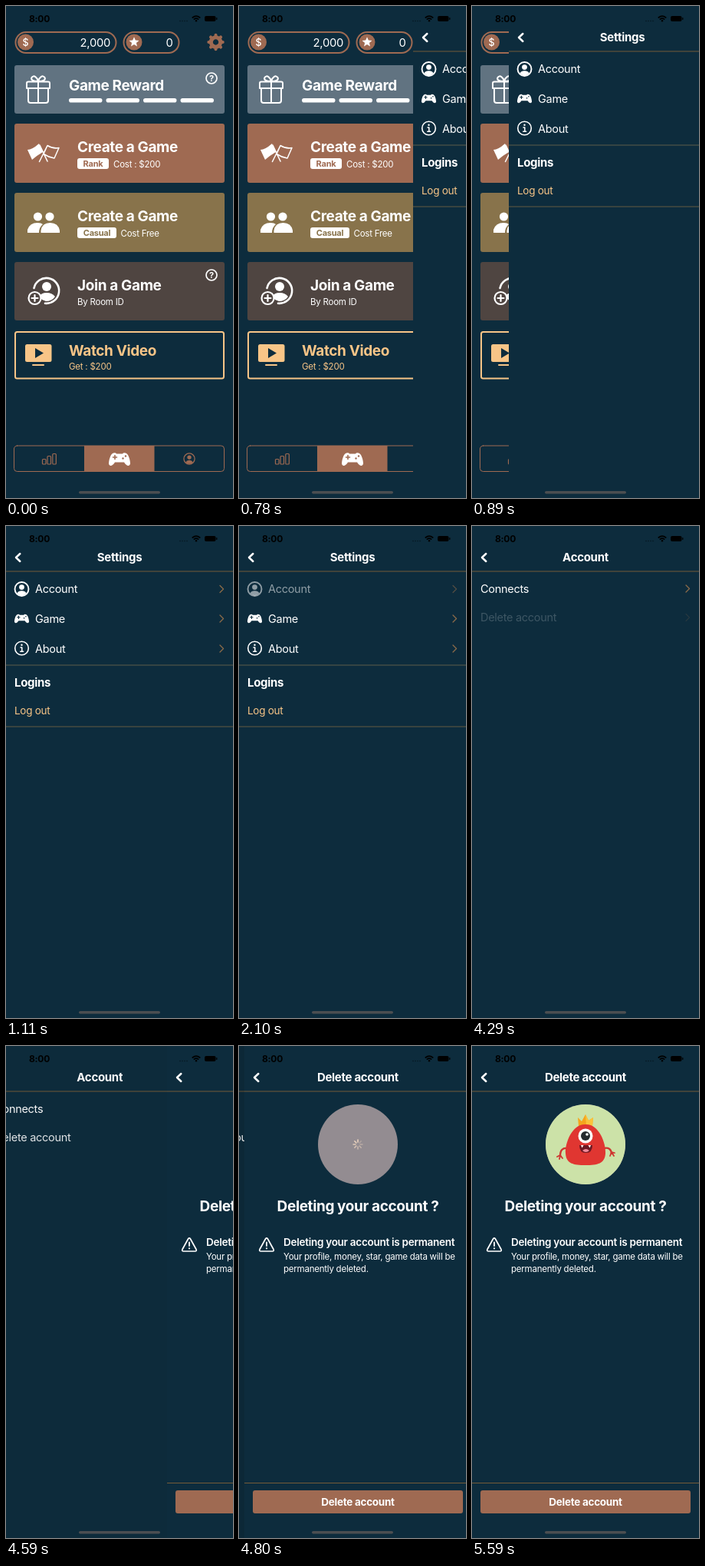
An HTML page with a canvas for the animation above (7990 ms loop, 296 by 640 pixels).

```html
<!DOCTYPE html>
<html lang="en">
<head>
<meta charset="utf-8">
<title>Game settings flow</title>
<style>
  html, body { margin: 0; width: 100%; height: 100%; overflow: hidden; background: #0d2c3d; }
  canvas { display: block; width: 296px; height: 640px; }
</style>
</head>
<body>
<canvas id="stage"></canvas>
<script>
const W = 296, H = 640, LOOP = 7990;
const BG = '#0d2c3d', WHITE = '#fff', COPPER = '#9f6a52', PEACH = '#f8c587', LINE = '#745b38', CHEVRON = '#8b6b49';
// The screen refreshes only at these moments.
const TICKS = [0, 500, 670, 780, 890, 1000, 1110, 1970, 2100, 2210, 2320, 2430, 2540,
  4290, 4480, 4590, 4690, 4800, 4910, 5040, 5160, 5270, 5370, 5480, 5590];

const canvas = document.getElementById('stage');
const ctx = canvas.getContext('2d');
const dpr = window.devicePixelRatio || 1;
canvas.width = W * dpr;
canvas.height = H * dpr;

// ---- drawing helpers ----
function fill(path, color) {
  ctx.fillStyle = color;
  ctx.fill(new Path2D(path), 'evenodd');
}
function stroke(path, color = WHITE, width = 2) {
  ctx.strokeStyle = color;
  ctx.lineWidth = width;
  ctx.lineCap = ctx.lineJoin = 'round';
  ctx.stroke(new Path2D(path));
}
function box(x, y, w, h, r, color, lineWidth) {
  ctx.beginPath();
  ctx.roundRect(x, y, w, h, r);
  ctx.fillStyle = ctx.strokeStyle = color;
  ctx.lineWidth = lineWidth;
  lineWidth ? ctx.stroke() : ctx.fill();
}
const dot = (x, y, r, color, lineWidth) => box(x - r, y - r, 2 * r, 2 * r, r, color, lineWidth);

function text(str, x, y, size, weight = 400, color = WHITE, align = 'left') {
  ctx.font = `${weight} ${size}px Inter, sans-serif`;
  ctx.letterSpacing = `${-0.02 * size}px`;
  ctx.textAlign = align;
  ctx.textBaseline = 'alphabetic';
  ctx.fillStyle = color;
  ctx.fillText(str, x, y + size * 0.364);
}
function group(x, y, scale, alpha, draw) {
  ctx.save();
  ctx.translate(x, y);
  ctx.scale(scale, scale);
  ctx.globalAlpha *= alpha;
  draw();
  ctx.restore();
}

// ---- icons ----
function gamepad(x, y, scale, holes) {
  group(x, y, scale, 1, () => {
    fill('M-8 -8Q-5 -9 -4 -7H4Q5 -9 8 -8C12 -7 14 2 14 6C13 10 9 9 6 4H-6C-9 9 -13 10 -14 6C-14 2 -12 -7 -8 -8Z', WHITE);
    stroke('M-8.5 -2.5H-3.5M-6 -5V0', holes, 1.6);
    dot(4.5, -1, 1.2, holes);
    dot(8, -4, 1.2, holes);
  });
}
function person(x, y, r, color, width) {
  group(x, y, r / 9, 1, () => {
    dot(0, 0, 8.5, color, width);
    dot(0, -2.3, 3.2, color);
    fill('M-5.8 5.3Q-4 2.2 0 2.2T5.8 5.3Q3 8 0 8T-5.8 5.3Z', color);
  });
}
function gear(x, y, alpha) {
  group(x, y, 1, alpha, () => {
    let teeth = '';
    for (let i = 0; i < 8; i++) {
      const a = i * Math.PI / 4;
      teeth += `M${6 * Math.cos(a)} ${6 * Math.sin(a)}L${9.2 * Math.cos(a)} ${9.2 * Math.sin(a)}`;
    }
    stroke(teeth, COPPER, 4);
    dot(0, 0, 6.2, COPPER, 5);
  });
}
function help(x, y) {
  dot(x, y, 7, WHITE, 1.7);
  text('?', x, y, 11, 700, WHITE, 'center');
}
function star(x, y, r) {
  let path = '';
  for (let i = 0; i < 10; i++) {
    const a = i * Math.PI / 5 - Math.PI / 2, d = i % 2 ? r * 0.45 : r;
    path += `${i ? 'L' : 'M'}${x + d * Math.cos(a)} ${y + d * Math.sin(a)}`;
  }
  fill(path + 'Z', WHITE);
}
function spinner(x, y, t) {
  const head = Math.floor(t / 125) % 8;
  for (let i = 0; i < 8; i++) {
    const a = i * Math.PI / 4, c = Math.cos(a), s = Math.sin(a);
    group(x, y, 1, 1 - ((head - i + 8) % 8) * 0.1, () =>
      stroke(`M${3 * c} ${3 * s}L${6 * c} ${6 * s}`, '#f3d9c2', 1.5));
  }
}
function monster() {
  dot(148, 128, 52, '#cce2a8');
  stroke('M124 133Q115 132 115 143M172 133Q181 131 182 140', '#cf3530', 2.4);
  stroke('M115 142L111 144M115 142L114 147M115 142L118 146M182 138L186 139M182 138L185 143M182 138L180 143', '#cf3530', 1.8);
  fill('M139 104L138 93L143 98L148 89L152 97L158 93L157 104Z', '#f5a51d');
  fill('M148 89L152 97L158 93L157 104H149Z', '#fbc33a');
  fill('M148 102C165 101 175 126 174 140C173 153 164 155 148 155S123 153 122 140C121 126 131 101 148 102Z', '#e03631');
  dot(148, 117, 9.5, WHITE);
  dot(148, 117, 6, '#25292d');
  dot(150, 115, 1.8, WHITE);
  fill('M140 129H157Q157 139 148.5 139T140 129Z', '#6b1822');
  fill('M142 129L143.5 132.5L145.5 129ZM151.5 129L153.5 132.5L155 129Z', WHITE);
  fill('M144 136Q148.5 132 153 136Q148.5 140 144 136Z', '#f08a9b');
}

// ---- shared layout ----
function statusBar() {
  text('8:00', 30, 16.5, 12, 700, '#000');
  for (let i = 0; i < 4; i++) dot(227 + i * 3, 19.5, 0.7, '#04131c');
  stroke('M243.3 15Q248 11.2 252.7 15M245.4 17.2Q248 15 250.6 17.2', '#000', 1.7);
  dot(248, 19.2, 1.2, '#000');
  box(259, 13, 14.5, 7, 2, '#000');
  box(274.2, 15, 1.2, 3, 0.6, '#000');
  box(95, 631, 106, 3.6, 1.8, '#4b4e51');
}
function rule(y, color = LINE) {
  box(0, y - 0.5, W, 1, 0, color);
}
function header(title) {
  box(0, 0, W, H, 0, BG);
  stroke('M18.3 36L13 41L18.3 46', WHITE, 2.5);
  text(title, 148, 41, 15, 700, WHITE, 'center');
  rule(59);
}
function row(label, x, y, alpha = 1) {
  group(0, 0, 1, alpha, () => {
    text(label, x, y, 14.5);
    stroke(`M279 ${y - 4.5}L283.5 ${y}L279 ${y + 4.5}`, CHEVRON, 1.3);
  });
}
function badge(label, y, width, color) {
  box(93, y - 7, width, 14, 3, WHITE);
  text(label, 93 + width / 2, y, 11, 700, color, 'center');
}

// ---- screens ----
function home(gearAlpha) {
  box(0, 0, W, H, 0, BG);
  box(12.5, 34, 131, 27, 13.5, COPPER, 2);
  dot(25.5, 47, 10.5, COPPER);
  text('$', 25.5, 47, 12.5, 500, WHITE, 'center');
  text('2,000', 136, 47.5, 14.8, 400, WHITE, 'right');
  box(153.5, 34, 72, 27, 13.5, COPPER, 2);
  dot(167, 47, 10.5, COPPER);
  star(167, 47, 6.8);
  text('0', 217.5, 47.5, 14.8, 400, WHITE, 'right');
  gear(273.5, 47, gearAlpha);

  box(11, 77, 274, 63, 3, '#617381');
  stroke('M29 98.5H55Q57 98.5 57 100.5V107H27V100.5Q27 98.5 29 98.5ZM29 107V123Q29 126 32 126H52Q55 126 55 123V107M42 98V126M42 98C35 98 32 96 33.5 93C36 89 41 93 42 98C43 93 48 89 50.5 93C52 96 49 98 42 98', WHITE, 2);
  text('Game Reward', 82, 103.5, 19, 700);
  for (let i = 0; i < 4; i++) box(82 + i * 48.5, 120, 43.5, 5.6, 2.8, WHITE);
  help(268, 94);

  box(11, 153, 274, 77, 3, COPPER);
  fill('M28 187Q34 187 43 179L48 190Q41 194 34 200Z', WHITE);
  stroke('M44 181L54 202', WHITE, 1.6);
  stroke('M54 181.5Q61 186 69 184.5L63 198Q56 197 49 192.5ZM54 181.5L43.5 202.5', WHITE, 1.5);
  text('Create a Game', 93, 183.5, 19, 700);
  badge('Rank', 205, 41, COPPER);
  text('Cost : $200', 140, 205.5, 11.5);

  box(11, 243, 274, 77, 3, '#88734b');
  dot(41.5, 274, 5.6, WHITE);
  dot(57, 274, 5.6, WHITE);
  fill('M28 295V291Q31 282 41 282Q46 282 48 284Q43 288 43 295ZM45.5 295V292Q47 282 57.5 282T70 292V295Z', WHITE);
  text('Create a Game', 93, 273.5, 19, 700);
  badge('Casual', 295, 51, '#88734b');
  text('Cost Free', 149.5, 295.5, 11.5);

  box(11, 333, 274, 76, 3, '#4f4541');
  stroke('M36.5 367A16.5 16.5 0 1 1 51 386.8', WHITE, 2.6);
  dot(53, 365, 6, WHITE);
  fill('M43 378Q46 373 53 373T64 378Q60 384 52 384L47 382Z', WHITE);
  dot(37.5, 380, 8.4, '#4f4541');
  dot(37.5, 380, 8, WHITE, 2.2);
  stroke('M33.5 380H41.5M37.5 376V384', WHITE, 2.2);
  text('Join a Game', 93, 363, 19, 700);
  text('By Room ID', 93, 385, 11.5);
  help(268, 350);

  box(12, 424, 272, 60.5, 2.5, PEACH, 2);
  box(25, 440, 34.5, 23, 2.5, PEACH);
  fill('M38 445L49 451.5L38 458Z', BG);
  stroke('M35 467H49', PEACH, 2);
  text('Watch Video', 82, 448.5, 19, 700, PEACH);
  text('Get : $200', 82, 469, 11.5, 400, PEACH);

  box(10.5, 572, 274, 33.5, 4, COPPER, 1);
  box(102, 572, 91.5, 33.5, 0, COPPER);
  box(47.5, 589.5, 4.5, 6.5, 1, COPPER, 1.2);
  box(54, 585.5, 4.5, 10.5, 1, COPPER, 1.2);
  box(60.8, 582.5, 4.5, 13.5, 1, COPPER, 1.2);
  gamepad(148, 589.5, 1, COPPER);
  person(239, 589, 7.5, COPPER, 1.5);
}

function settings(accountAlpha) {
  header('Settings');
  group(0, 0, 1, accountAlpha, () => person(20.5, 82, 9.5, WHITE, 1.8));
  row('Account', 38, 82, accountAlpha);
  gamepad(20.5, 120.5, 0.68, BG);
  row('Game', 38, 120.5);
  dot(20.5, 159, 8.8, WHITE, 1.6);
  dot(20.5, 154.7, 1.2, WHITE);
  stroke('M19 158H20.8V163M18.7 163.2H22.6', WHITE, 1.5);
  row('About', 38, 159.5);
  rule(181, '#5f5c4b');
  text('Logins', 11, 203.5, 15, 700);
  text('Log out', 11, 240, 13.5, 400, PEACH);
  rule(261, '#655a43');
}

function account(deleteAlpha) {
  header('Account');
  row('Connects', 11, 81.5);
  row('Delete account', 11, 119, deleteAlpha);
}

function deletion(t) {
  const loaded = Math.min(1, Math.max(0, (t - 5320) / 270));
  header('Delete account');
  dot(148, 128, 52, '#938c91');
  spinner(148, 128, t);
  group(0, 0, 1, loaded, monster);
  text('Deleting your account ?', 148, 208, 19, 700, WHITE, 'center');
  stroke('M27.5 251Q29 248.8 30.5 251L38 264.5Q39 267 36.5 267H21.5Q19 267 20 264.5Z', WHITE, 1.7);
  stroke('M29 255.5V260', WHITE, 1.8);
  dot(29, 263.3, 1.1, WHITE);
  text('Deleting your account is permanent', 51, 255.5, 13.5, 600);
  text('Your profile, money, star, game data will be', 51, 274, 11.5);
  text('permanently deleted.', 51, 289.5, 11.5);
  rule(568.5);
  box(11, 578, 274, 30, 3, COPPER);
  text('Delete account', 148, 593, 13.5, 700, WHITE, 'center');
}

// ---- motion ----
// Distance left to travel for a screen pushed in by a critically damped spring.
function pushX(t, start) {
  const s = Math.max(0, t - start) * 0.0213;
  return Math.floor(W * (1 + s) * Math.exp(-s));
}
// A touched control fades to 20 % and recovers after release.
function touch(t, down, up) {
  if (t < down) return 1;
  const k = Math.min(1, Math.max(0, (t - up) / 250));
  return 0.2 + 0.8 * k * (2 - k);
}
function push(x, under, over) {
  if (x > 0) {
    group(-0.3 * (W - x), 0, 1, 1, under);
    box(0, 0, W, H, 0, `rgba(0,0,0,${0.1 * (1 - x / W)})`);
  }
  if (x < W) group(x, 0, 1, 1, over);
}

function render(t) {
  const accountX = pushX(t, 2175), deleteX = pushX(t, 4540);
  const settingsView = () => settings(touch(t, 1970, 2040));
  const accountView = () => account(touch(t, 4290, 4430));
  if (accountX === W) {
    home(touch(t, 500, 600));
    group(pushX(t, 737.2), 0, 1, 1, settingsView);
  } else if (deleteX === W) {
    push(accountX, settingsView, accountView);
  } else {
    push(deleteX, accountView, () => deletion(t));
  }
  statusBar();
}

const origin = performance.now();
function frame() {
  const now = (performance.now() - origin) % LOOP;
  ctx.setTransform(dpr, 0, 0, dpr, 0, 0);
  render(TICKS.findLast(tick => tick <= now));
  requestAnimationFrame(frame);
}
frame();
</script>
</body>
</html>
```
